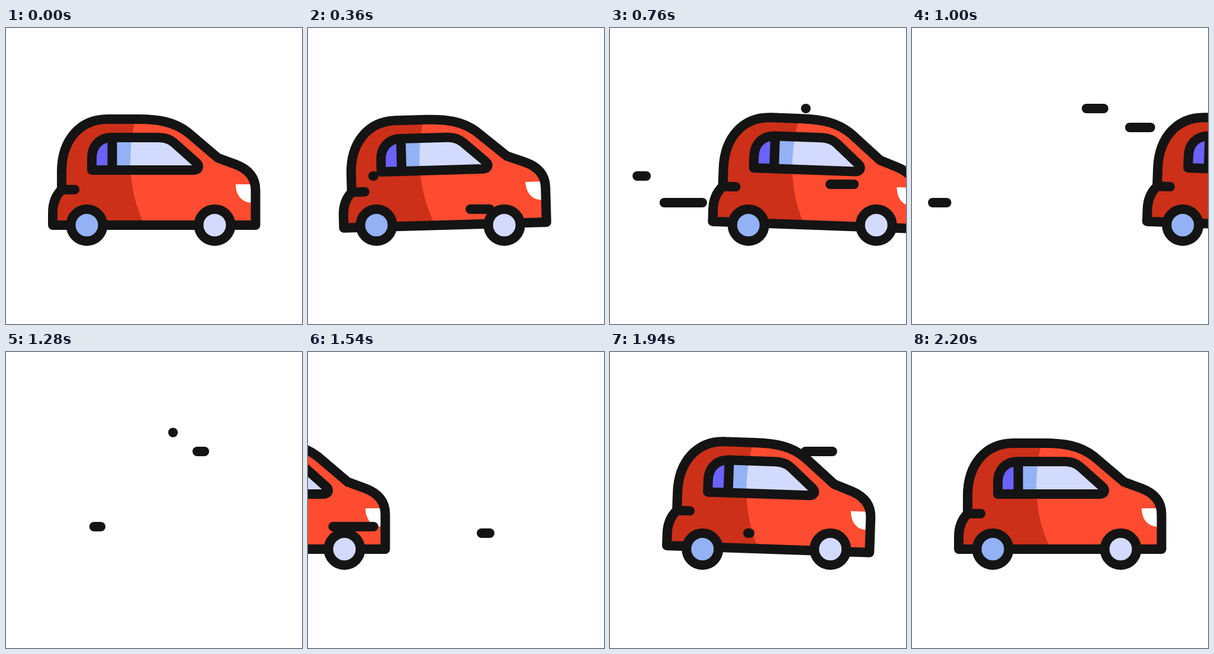
Write an HTML page that moves like this. It is 500x500 px and loops after 2.32 s.

```html
<!DOCTYPE html>
<html lang="en">
<head>
<meta charset="utf-8">
<title>Car drive loop</title>
<style>
  html, body { margin: 0; width: 100%; height: 100%; overflow: hidden; background: #fff; }
  svg { display: block; width: 100%; height: 100%; }
  .ink { fill: none; stroke: #141414; stroke-width: 16; stroke-linecap: round; stroke-linejoin: round; }
</style>
</head>
<body>
<svg viewBox="0 0 500 500">
  <defs>
    <path id="shell" d="M79 333V312C79 296 84 283 94 273V243C94 190 124 154 172 154H224C256 154 284 158 308 177L358 219.5L388 230.5C409 238.5 421.5 252 421.5 274V333Z"/>
    <path id="glass" d="M145 240V220C145 199 158 185 179 185H258C269 185 277 188 284 194L321 227C328 233 325 240 317 240Z"/>
    <path id="shade" d="M60 140H222Q193 248 234 333V345H60Z"/>
    <clipPath id="inShell"><use href="#shell"/></clipPath>
    <clipPath id="inGlass"><use href="#glass"/></clipPath>
  </defs>
  <g id="car">
    <g id="body">
      <g clip-path="url(#inShell)">
        <path fill="#ff4c30" d="M60 140H440V345H60Z"/>
        <use href="#shade" fill="#cc3019"/>
        <path fill="#fff" d="M388 264H425V295H413C398 294 388 282 388 264Z"/>
      </g>
      <g clip-path="url(#inGlass)">
        <path fill="#d2dbfd" d="M130 170H340V250H130Z"/>
        <use href="#shade" fill="#93b1f5"/>
        <path fill="#6a62fb" d="M130 170H179V250H130Z"/>
      </g>
      <use href="#shell" class="ink"/>
      <use href="#glass" class="ink"/>
      <path class="ink" d="M179.5 185V240M94 273H116"/>
    </g>
    <circle class="ink" cx="136.5" cy="333" r="27" style="fill:#93b1f5"/>
    <circle class="ink" cx="352.5" cy="333" r="27" style="fill:#d2dbfd"/>
  </g>
  <g id="streaks" class="ink"></g>
</svg>
<script>
const LOOP = 2320, STEP = 20;
const SWEEP = 390, TAIL_LAG = 165;

// Wind streaks run from right to left; starts are in ms.
const streaks = [
  { y: 250, right: 111.3, length: 65.3, starts: [326] },
  { y: 306, right: 307, length: 74, starts: [180, 1432] },
  { y: 295, right: 160, length: 125, starts: [553, 1208] },
  { y: 264, right: 442, length: 74, starts: [425] },
  { y: 136, right: 331, length: 49, starts: [740] },
  { y: 168, right: 403, length: 80, starts: [821, 1622] }
];

// Each motion has a leaving leg and an arriving leg; keys are [time, value].
const travel = [
  [[180, 0], [478, -32], [1453, 606]],
  [[1270, -477], [1920, 20], [2200, 0]]
];
const tilt = [
  [[180, 0], [480, -2.5], [780, 2.1]],
  [[1550, 0], [1920, 2], [2200, 0]]
];
const RETURN = 1270;

const ease = v => {
  v = Math.min(1, Math.max(0, v));
  return v * v * (3 - 2 * v);
};

function valueAt(keys, t) {
  let value = keys[0][1];
  for (let i = 1; i < keys.length; i++) {
    const [t0, a] = keys[i - 1], [t1, b] = keys[i];
    if (t >= t0) value = a + (b - a) * ease((t - t0) / (t1 - t0));
  }
  return value;
}

const car = document.getElementById("car");
const body = document.getElementById("body");
const group = document.getElementById("streaks");
for (const s of streaks) {
  s.path = document.createElementNS("http://www.w3.org/2000/svg", "path");
  group.append(s.path);
}

function streakPath({ y, right, length, starts }, t) {
  const start = starts.find(s => t > s && t < s + SWEEP + TAIL_LAG);
  if (start === undefined) return "";
  const head = right - length * ease((t - start) / SWEEP);
  const tail = right - length * ease((t - start - TAIL_LAG) / SWEEP);
  return `M${tail} ${y}H${head - 0.01}`;
}

function draw(t) {
  const leg = t < RETURN ? 0 : 1;
  car.setAttribute("transform", `translate(${valueAt(travel[leg], t)} 0)`);
  body.setAttribute("transform", `rotate(${valueAt(tilt[leg], t)} 250 250)`);
  for (const s of streaks) s.path.setAttribute("d", streakPath(s, t));
}

let origin;
function tick(now) {
  origin ??= now;
  const t = (now - origin) % LOOP;
  draw(Math.floor(t / STEP) * STEP);
  requestAnimationFrame(tick);
}
draw(0);
requestAnimationFrame(tick);
</script>
</body>
</html>
```
